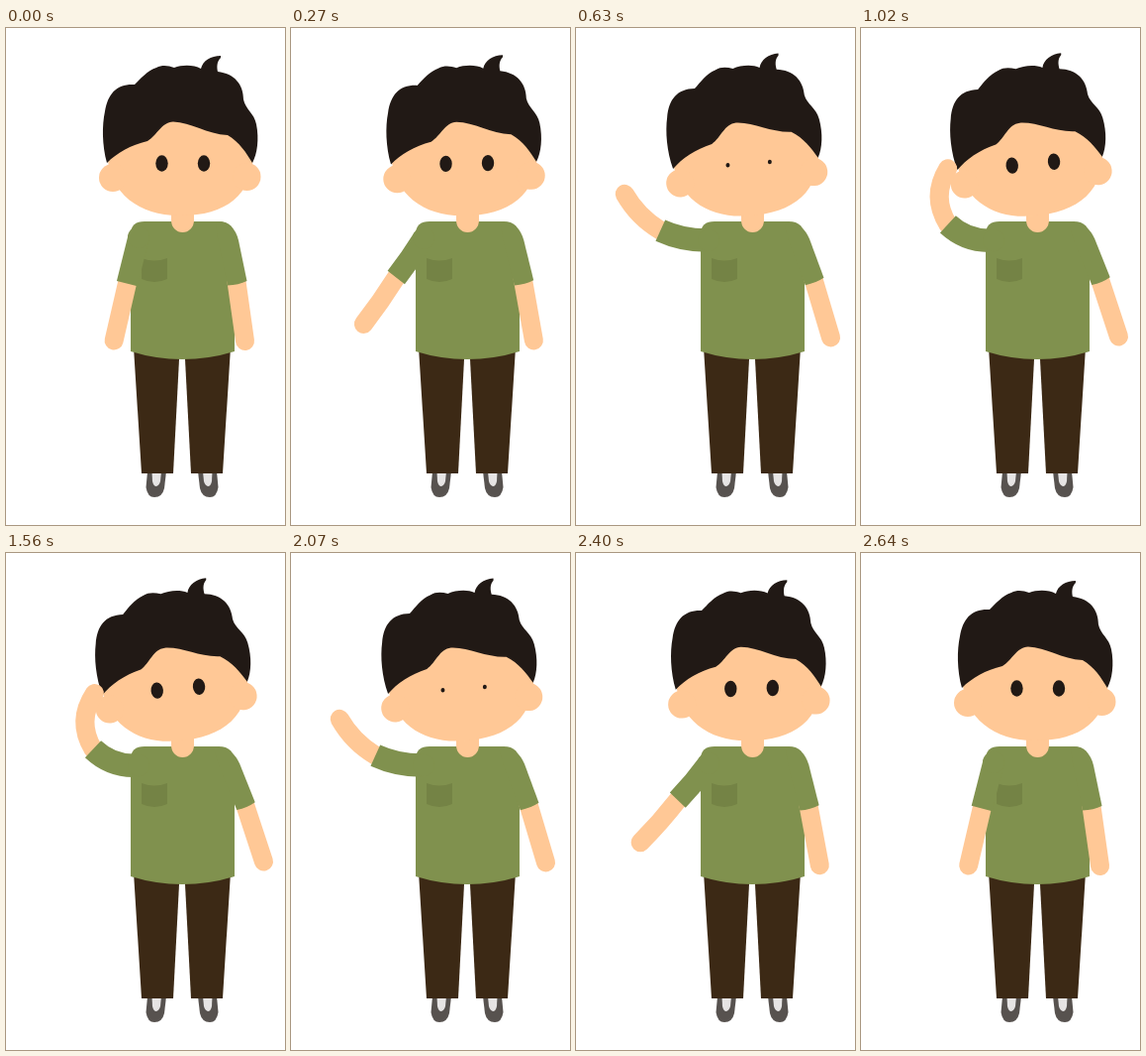
Recreate the animation shown at these times as an HTML page. Size 282 by 501 pixels, loop 2.7 s.

```html
<!DOCTYPE html>
<html lang="en">
<head>
<meta charset="utf-8">
<title>Scratching head</title>
<style>
  html, body { margin: 0; width: 100%; height: 100%; overflow: hidden; background: #fff; }
  svg { display: block; width: 100%; height: 100%; }
  .skin { fill: #ffc896; }
  .shirt { fill: #80914e; }
  .hair { fill: #211915; }
  .pants { fill: #3c2915; }
  .limb { fill: none; stroke: #ffc896; stroke-width: 19; stroke-linecap: round; }
  .sleeve { fill: none; stroke: #80914e; }
</style>
</head>
<body>
<svg viewBox="0 0 282 501">
  <defs>
    <g id="leg">
      <path fill="#57524f" d="M143 447L141.500 463Q143 473 150 473Q158 473 160 464L162 447Z"/>
      <path fill="#e6e4e4" d="M147.500 447L148 457Q149 462 152 462Q155 461 156 457L157 447Z"/>
      <path class="pants" d="M129 322L175 322L175 334L169 449L137 449Z"/>
    </g>
  </defs>
  <use href="#leg"/>
  <use href="#leg" transform="matrix(-1 0 0 1 356 0)"/>

  <path class="shirt" d="M126 326V208Q126 195 140 195H215Q231 195 231 212V326Q205 334 178 334Q152 334 126 326Z"/>
  <path fill="#748345" d="M137 232Q150 237 163 232V253Q150 259 137 253Z"/>

  <g id="rightArm">
    <path class="limb" d="M232.500 252L241.500 315.500"/>
    <path class="shirt" d="M212 195Q230 194 235 214L243.500 255Q235 259 224 259.500L214 212Z"/>
  </g>

  <path class="skin" d="M167 180H190V194A11.500 12 0 0 1 167 194Z"/>

  <g id="head">
    <path class="skin" d="M102 125C104 168 136 189 174 189C220 190 250 170 250 125L225 90H130Z"/>
    <circle class="skin" cx="108" cy="151" r="14"/>
    <circle class="skin" cx="243.500" cy="150" r="14"/>
    <path class="hair" d="M102 136C97 118 97 98 100 84C103 66 112 56 130 57C136 51 143 43 152 40C158 37 164 38 170 40C178 37 190 37 197 41C199 33 207 28 217 28L217 30C213 34 213 39 214 44C231 46 240 57 240 72C242 82 251 86 253 97C256 112 254 127 249 136C243 126 236 115 224 108C203 107 187 95 169 94.500C157 95 153 108 143 114C126 118 112 126 102 136Z"/>
    <ellipse class="hair eye" cx="157.500" cy="136.500"/>
    <ellipse class="hair eye" cx="200" cy="136.500"/>
  </g>

  <path id="forearm" class="limb"/>
  <path id="sleeve" class="sleeve"/>
  <circle id="shoulder" class="shirt" r="11"/>
</svg>
<script>
const LOOP = 2700, STEP = 30;
const $ = id => document.getElementById(id);
const clamp = x => Math.max(0, Math.min(1, x));

// Left arm segment angles in degrees, measured from straight down, shoulder to hand.
const REST = [14, 14, 13, 13];
const RAISED = [95, 108, 128, 143];
const SCRATCH = [97, 122, 164, 199];

// Quadratic from a to c that passes through b.
const bend = (a, b, c) => {
  const mid = i => 2 * b[i] - (a[i] + c[i]) / 2;
  return `M${a}Q${mid(0)} ${mid(1)} ${c}`;
};

function drawArm(lean, time) {
  const lift = Math.min(1, lean / 0.843);
  const fold = 1 - (1 - clamp((time - 630) / 480)) ** 2;
  const points = [[134, 211 + 3 * lift]];
  for (let i = 0; i < 4; i++) {
    const upper = i < 2;
    const raise = upper ? lift : lift ** 1.2;
    const degrees = REST[i] + (RAISED[i] - REST[i]) * raise + (SCRATCH[i] - RAISED[i]) * fold;
    const angle = degrees * Math.PI / 180;
    const length = upper ? 24 + lift : 29.5 - 3.5 * lift + 3.5 * fold;
    const [x, y] = points[i];
    points.push([x - length * Math.sin(angle), y + length * Math.cos(angle)]);
  }
  $('sleeve').setAttribute('d', bend(...points.slice(0, 3)));
  $('sleeve').setAttribute('stroke-width', 21.5 + 2 * lift);
  $('forearm').setAttribute('d', bend(...points.slice(2)));
  $('shoulder').setAttribute('cx', points[0][0]);
  $('shoulder').setAttribute('cy', points[0][1]);
}

function draw(now) {
  const t = Math.floor(now % LOOP / STEP) * STEP;
  const time = Math.min(t, LOOP - t); // the second half plays backwards
  const lean = (1 - Math.cos(Math.PI * clamp((time - 30) / 810))) / 2;
  const open = clamp(Math.abs(time - 630) / 150);

  $('head').setAttribute('transform', `rotate(${-5.2 * lean} 178 190)`);
  $('rightArm').setAttribute('transform', `rotate(${-10.2 * lean} 226 207)`);
  for (const eye of document.querySelectorAll('.eye')) {
    eye.setAttribute('rx', 2 + 4.2 * open);
    eye.setAttribute('ry', 2.2 + 6 * open);
  }
  drawArm(lean, time);
  requestAnimationFrame(draw);
}
requestAnimationFrame(draw);
</script>
</body>
</html>
```
